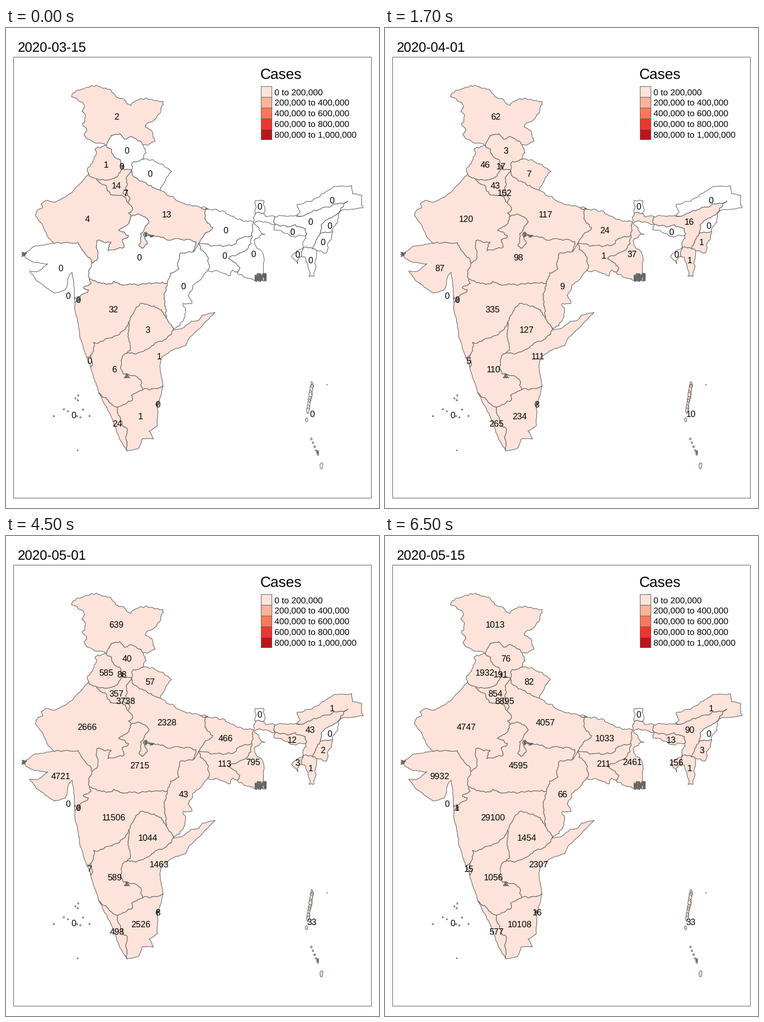
These frames come from a looping animation (660 px wide and 849 px high, 8 s). A matplotlib script:

```python
import numpy as np
import matplotlib.pyplot as plt
from matplotlib.animation import FuncAnimation
from matplotlib.patches import Polygon, Rectangle

W, H, DPI = 660, 849, 100
PX = 72 / DPI
LINE = "#666666"
REDS = ["#FDE3D9", "#FCB499", "#FB7859", "#EC382B", "#BC141A"]
DATES = [f"2020-{month:02}-{day:02}" for month in (3, 4, 5) for day in (1, 15)][1:]

plt.rcParams.update({"font.family": "Liberation Sans", "text.hinting": "none"})
rng = np.random.default_rng(5)
fig = plt.figure(figsize=(W / DPI, H / DPI), dpi=DPI, facecolor="white")
ax = fig.add_axes([0, 0, 1, 1])
ax.set(xlim=(0, W), ylim=(H, 0))
ax.axis("off")


def arc(*points, rough=0.22):
    """Fractal border through a few key points."""
    pts = np.array(points, float)
    while True:
        step = np.diff(pts, axis=0)
        length = np.hypot(*step.T)[:, None]
        if length.mean() < 3.5:
            return pts
        shift = rng.uniform(-1, 1, length.shape) * rough * np.minimum(1, 10 / length)
        mids = pts[:-1] + step / 2 + step[:, ::-1] * [1, -1] * shift
        pts = np.insert(pts, np.arange(1, len(pts)), mids, axis=0)


def coast(*points):
    return arc(*points, rough=0.1)


def ring(first, *rest):
    """Chain arcs end to end, turning each one round where needed."""
    def gap(p, line):
        return min(np.hypot(*(p - line[0])), np.hypot(*(p - line[-1])))

    if gap(first[0], rest[0]) < gap(first[-1], rest[0]):
        first = first[::-1]
    chain = [first]
    for line in rest:
        end = chain[-1][-1]
        flip = np.hypot(*(end - line[-1])) < np.hypot(*(end - line[0]))
        chain.append(line[::-1] if flip else line)
    return np.vstack(chain)


def blob(x, y, rx, ry, n=9):
    angle = np.linspace(0, 2 * np.pi, n, endpoint=False)
    r = rng.uniform(0.5, 1.1, n)
    return np.column_stack([x + rx * r * np.cos(angle), y + ry * r * np.sin(angle)])


def thicket(x, y, rx, ry):
    """Tangle of creeks or enclaves, so dense that it reads as a dark patch."""
    spots = np.array([x, y]) + rng.uniform(-1, 1, (int(8 + rx * ry / 2), 2)) * [rx, ry]
    ax.plot(*spots.T, color=LINE, lw=0.8, zorder=2)


def label(x, y, text, px, **kw):
    return ax.text(x, y, text, fontsize=px * PX, color="black", zorder=3, **kw)


states = []


def state(x, y, counts, *outlines):
    shapes = [ax.add_patch(Polygon(line, ec=LINE, lw=0.75, joinstyle="round"))
              for line in outlines]
    states.append((counts, shapes, label(x, y + 5.2, "", 15.5, ha="center")))


NONE = (0,) * len(DATES)

# North
jk_out = arc((177, 208), (147, 197), (138, 189), (143, 182), (135, 170), (140, 153),
             (134, 147), (139, 140), (131, 130), (116, 122), (126, 110), (160, 101),
             (186, 110), (199, 124), (221, 137), (238, 125), (278, 130), (273, 150),
             (262, 163), (252, 167), (247, 176), (258, 181), (264, 200), (243, 207))
jk_hp = arc((177, 208), (186, 190), (201, 187), (210, 197), (224, 193), (243, 207))
hp_out = arc((243, 207), (248, 221), (241, 232))
hp_uk = arc((241, 232), (226, 236), (222, 251))
hp_hr = arc((222, 251), (207, 249))
hp_pb = arc((177, 208), (187, 215), (190, 224), (203, 236), (207, 249))
pb_hr = arc((207, 249), (198, 262), (185, 268), (160, 267))
pb_rj = arc((160, 267), (146, 258))
pb_out = arc((146, 258), (145, 247), (160, 222), (158, 213), (177, 208))
hr_up = arc((222, 251), (213, 273), (212, 283), (220, 303), (216, 309))
hr_rj = arc((216, 309), (206, 296), (185, 295), (178, 280), (160, 267))
uk_up = arc((222, 251), (224, 261), (250, 277), (273, 287))
uk_out = arc((241, 232), (255, 234), (278, 241), (293, 254), (273, 287))

# Centre
rj_up = arc((216, 309), (224, 322), (217, 327), (222, 333))
rj_out = coast((146, 258), (126, 280), (118, 290), (88, 308), (70, 305), (62, 311),
               (65, 318), (56, 322), (52, 332), (64, 347), (72, 366), (86, 381))
rj_gj = arc((86, 381), (128, 380), (136, 394), (147, 406), (152, 416))
rj_mp = arc((152, 416), (163, 407), (161, 376), (186, 379), (180, 394), (209, 388),
            (206, 374), (217, 367), (199, 358), (218, 345), (222, 333))
up_mp = arc((331, 396), (336, 378), (308, 374), (282, 373), (248, 361), (243, 366),
            (250, 382), (240, 390), (235, 384), (238, 364), (253, 344), (240, 331),
            (222, 333))
up_out = arc((273, 287), (288, 297), (306, 307), (345, 318))
up_br = arc((345, 318), (357, 320), (352, 325), (354, 341), (366, 353), (352, 364),
            (341, 381))
up_cg = arc((341, 381), (343, 391), (331, 396))
br_out = arc((345, 318), (381, 324), (407, 337), (438, 344))
br_wb = arc((438, 344), (435, 367))
br_jh = arc((341, 381), (384, 387), (402, 384), (408, 376), (435, 367))
jh_wb = arc((435, 367), (434, 381), (424, 394), (394, 408), (414, 424), (409, 432))
jh_out = arc((409, 432), (402, 428), (397, 438), (380, 432), (357, 428))
jh_cg = arc((341, 381), (343, 391), (358, 407), (357, 428))
cg_out = arc((357, 428), (343, 446), (331, 455), (322, 473), (329, 487), (314, 487),
             (318, 500), (308, 527), (296, 534))
cg_tg = arc((296, 534), (284, 514))
cg_mh = arc((284, 514), (281, 484), (285, 452))
cg_mp = arc((285, 452), (291, 433), (306, 426), (307, 400), (331, 396))
wb_west = arc((438, 344), (441, 328))
wb_sk = arc((441, 328), (456, 328))
wb_north = arc((456, 328), (460, 334), (476, 334))
wb_as = arc((476, 334), (476, 347))
wb_south = arc((476, 347), (449, 341), (440, 347), (458, 365), (441, 373), (440, 380),
               (455, 400), (460, 446), (442, 447), (428, 443), (409, 432))
sk_out = arc((441, 328), (441, 305), (456, 305), (456, 328))

# North-east
as_ml = arc((476, 347), (512, 348), (530, 355), (531, 366))
ml_out = arc((476, 347), (474, 357), (505, 369), (531, 366))
as_south = arc((531, 366), (526, 388))
as_mz = arc((526, 388), (543, 391))
as_mn = arc((543, 391), (556, 364))
as_nl = arc((556, 364), (558, 348), (590, 325))
as_ar = arc((590, 325), (605, 306), (584, 311), (523, 333))
as_north = arc((523, 333), (476, 334))
ar_out = arc((523, 333), (514, 331), (520, 326), (515, 312), (544, 303), (569, 288),
             (577, 283), (612, 279), (613, 293), (630, 297), (632, 318), (590, 325))
nl_out = arc((590, 325), (587, 338), (578, 360))
mn_nl = arc((556, 364), (578, 360))
mn_out = arc((578, 360), (567, 398), (550, 394))
mn_mz = arc((543, 391), (550, 394))
mz_tr = arc((526, 388), (522, 404))
mz_out = arc((522, 404), (529, 405), (536, 439), (545, 439), (550, 394))
tr_out = arc((526, 388), (505, 404), (516, 417), (522, 404))

# West
gj_coast = coast((86, 381), (48, 387), (31, 402), (50, 415), (74, 417), (58, 430),
                 (42, 430), (54, 447), (86, 469), (105, 463), (111, 440), (117, 432),
                 (121, 462), (122, 486))
gj_mp = arc((152, 416), (146, 430), (148, 444))
gj_mh = arc((148, 444), (151, 452), (137, 459), (146, 463), (133, 472), (122, 486))
mh_mp = arc((148, 444), (184, 453), (191, 448), (206, 455), (253, 451), (285, 452))
mh_coast = coast((122, 486), (122, 500), (130, 540), (143, 583))
mh_ga = arc((143, 583), (150, 579))
ga_ka = arc((150, 579), (153, 594), (150, 600))
ga_coast = coast((143, 583), (150, 600))
mh_ka = arc((150, 579), (155, 556), (188, 548), (205, 537), (217, 520))
mh_tg = arc((217, 520), (237, 488), (270, 497), (284, 514))

# South
tg_ka = arc((217, 520), (220, 567), (213, 576))
tg_ap = arc((213, 576), (240, 573), (284, 550), (296, 534))
ap_coast = coast((296, 534), (311, 532), (327, 519), (341, 517), (347, 508), (370, 503),
                 (348, 526), (325, 547), (318, 562), (300, 567), (275, 583), (273, 604),
                 (278, 633))
ap_ka = arc((213, 576), (206, 580), (207, 612), (238, 622), (242, 640))
ap_tn = arc((278, 633), (242, 640))
ka_tn = arc((242, 640), (222, 650), (224, 658), (197, 671))
ka_kl = arc((197, 671), (164, 645))
ka_coast = coast((150, 600), (164, 645))
kl_tn = arc((197, 671), (205, 700), (214, 708), (214, 748))
kl_coast = coast((164, 645), (186, 687), (203, 730), (214, 748))
tn_coast = coast((214, 748), (235, 743), (241, 727), (261, 727), (253, 713), (268, 703),
                 (268, 672), (278, 633))

# Islands
lakshadweep = [blob(x, y, 1.4, 1.4) for x, y in rng.normal((123, 676), (17, 14), (10, 2))]
andaman = [blob(542 - 8 * t, 630 + 46 * t, 3, 6) for t in np.linspace(0, 1, 10)]
little_andaman = blob(532, 693, 3, 4)
nicobar = [blob(540 + 12 * t, 727 + 27 * t, 1.8, 2) for t in np.linspace(0, 1, 5)]
great_nicobar = blob(558.5, 774, 3.5, 7)

state(195.5, 157, (2, 62, 300, 639, 1013), ring(jk_out, jk_hp))
state(214, 217, (0, 3, 35, 40, 76), ring(jk_hp, hp_out, hp_uk, hp_hr, hp_pb))
state(177, 242, (1, 46, 186, 585, 1932), ring(pb_out, hp_pb, pb_hr, pb_rj))
state(255, 257.5, (0, 7, 37, 57, 82), ring(uk_out, uk_up, hp_uk))
state(195.5, 278.5, (14, 43, 204, 357, 854), ring(pb_hr, hr_rj, hr_up, hp_hr))
state(143.5, 337.5, (4, 120, 1076, 2666, 4747),
      ring(rj_out, rj_gj, rj_mp, rj_up, hr_rj, pb_rj))
state(284, 329.5, (13, 117, 735, 2328, 4057),
      ring(up_out, up_br, up_cg, up_mp, rj_up, hr_up, uk_up))
state(389, 358, (0, 24, 72, 466, 1033), ring(br_out, br_wb, br_jh, up_br))
state(387, 403, (0, 1, 28, 113, 211), ring(br_jh, jh_wb, jh_out, jh_cg))
state(437.5, 399.5, (0, 37, 213, 795, 2461),
      ring(wb_west, wb_sk, wb_north, wb_as, wb_south, jh_wb, br_wb))
state(448.5, 315.5, NONE, ring(sk_out, wb_sk))
state(538.5, 342.5, (0, 16, 33, 43, 90),
      ring(as_north, as_ar, as_nl, as_mn, as_mz, as_south, as_ml, wb_as))
state(577, 305, (0, 0, 1, 1, 1), ring(ar_out, as_ar))
state(572.5, 349.5, NONE, ring(nl_out, mn_nl, as_nl))
state(560.5, 379, (0, 1, 2, 2, 3), ring(mn_nl, mn_out, mn_mz, as_mn))
state(539, 411, (0, 1, 1, 1, 1), ring(as_mz, mn_mz, mz_out, mz_tr))
state(515.5, 401, (0, 0, 2, 3, 156), ring(tr_out, mz_tr))
state(506.5, 360.5, (0, 0, 7, 12, 13), ring(as_ml, ml_out))
state(314, 457, (0, 9, 33, 43, 66), ring(cg_out, cg_tg, cg_mh, cg_mp, up_cg[-2:], jh_cg))
state(236, 406, (0, 98, 938, 2715, 4595), ring(up_mp, rj_mp, gj_mp, mh_mp, cg_mp))
state(96.5, 425, (0, 87, 766, 4721, 9932), ring(gj_coast, gj_mh, gj_mp, rj_gj))
state(190.5, 497.5, (32, 335, 2916, 11506, 29100),
      ring(mh_coast, mh_ga, mh_ka, mh_tg, cg_mh, mh_mp, gj_mh))
state(251, 534, (3, 127, 650, 1044, 1454), ring(mh_tg, cg_tg, tg_ap, tg_ka))
state(271, 580.5, (1, 111, 525, 1463, 2307), ring(ap_coast, ap_tn, ap_ka, tg_ap))
state(192, 604, (6, 110, 279, 589, 1056),
      ring(ka_coast, ka_kl, ka_tn, ap_ka, tg_ka, mh_ka, ga_ka))
state(148, 589, (0, 5, 7, 7, 15), ring(ga_coast, ga_ka, mh_ga))
state(238.5, 687, (1, 234, 1242, 2526, 10108), ring(tn_coast, ap_tn, ka_tn, kl_tn))
state(197, 699.5, (24, 265, 388, 498, 577), ring(kl_coast, kl_tn, ka_kl))
state(205, 244.5, (0, 17, 21, 88, 191), blob(206, 245, 2.5, 3))
state(212, 292, (7, 152, 1578, 3738, 8895), blob(211, 291, 4, 6))
state(110, 474, NONE, blob(122, 478, 1, 2))
state(127.5, 480.5, (0, 0, 0, 0, 1), blob(128, 481, 3.5, 4))
state(269, 665.5, (0, 3, 7, 8, 16), blob(268, 665, 3, 3))
state(120, 685, NONE, *lakshadweep, blob(127, 747, 1, 1))
state(541.5, 682.5, (0, 10, 11, 33, 33), *andaman, little_andaman, *nicobar,
      great_nicobar, blob(568, 631, 0.6, 0.6))

for patch in ((32, 400, 5, 4), (206, 245, 2, 3), (247, 366, 3, 4), (256, 368, 6, 2),
              (214, 615, 5, 4), (128, 481, 3, 3), (268, 665, 3, 3), (551, 750, 2, 3)):
    thicket(*patch)
for x in np.arange(442, 461, 2):
    thicket(x, 441, 1.2, rng.uniform(6, 9))

# Frame, title and legend
ax.add_patch(Rectangle((13, 51), 633, 780, fill=False, ec=LINE, lw=0.72))
title = label(20.5, 43, "", 23.7)
label(450, 90, "Cases", 26)
for i, color in enumerate(REDS):
    top = 103.4 + 18.8 * i
    ax.add_patch(Rectangle((451.4, top), 18.8, 18.8, fc=color, ec=LINE, lw=0.72))
    low = 200_000 * i
    label(475.3, top + 15.2, f"{low:,} to {low + 200_000:,}", 15.45)


def draw(frame):
    step = (frame + 3) // 4
    title.set_text(DATES[step])
    for counts, shapes, text in states:
        count = counts[step]
        text.set_text(str(count))
        for shape in shapes:
            shape.set_facecolor(REDS[count // 200_000] if count else "white")
    return []


anim = FuncAnimation(fig, draw, frames=16, interval=500, repeat=True)
plt.show()
```
